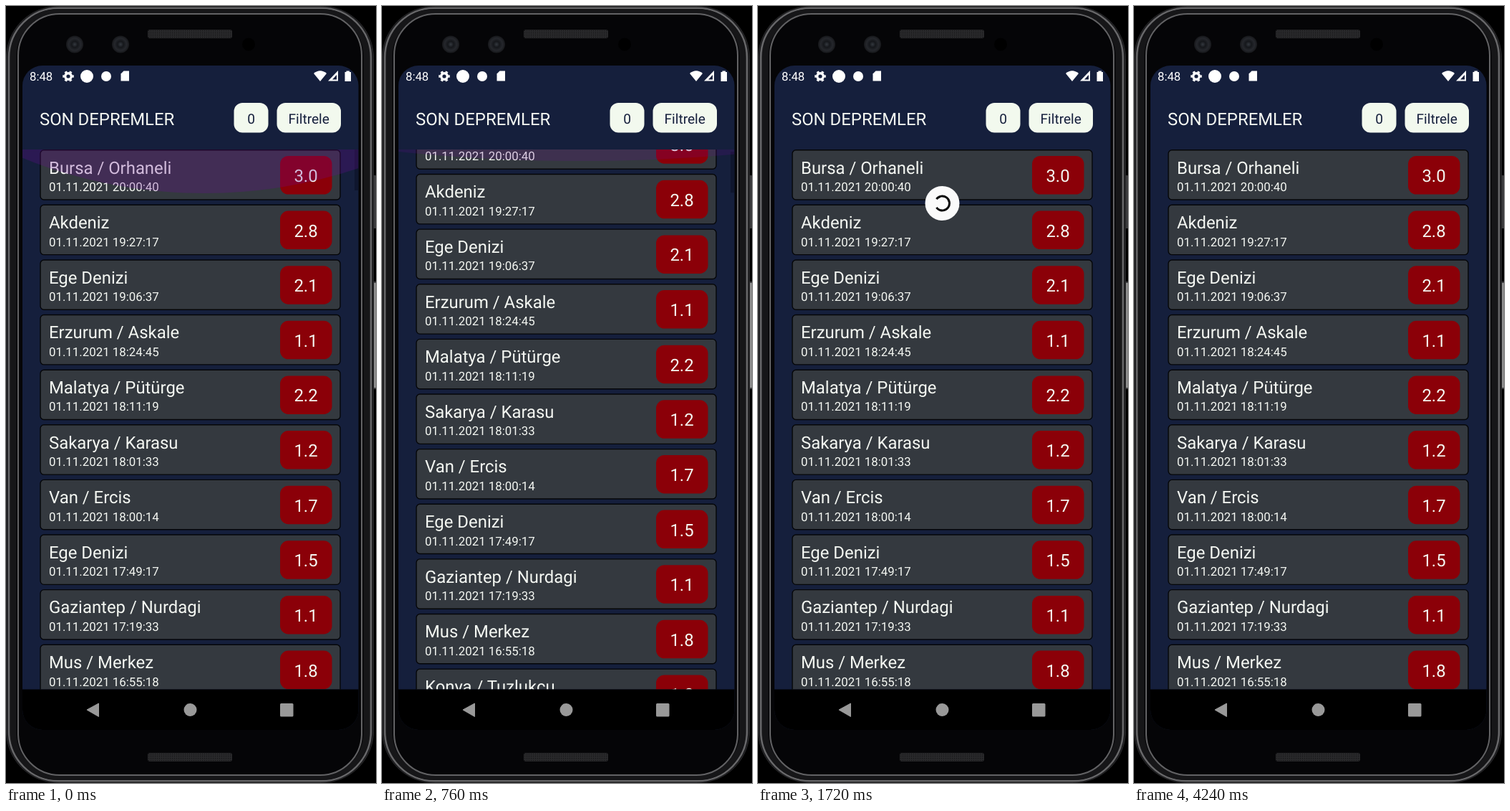
These frames come from a looping animation (517 px wide and 1083 px high, 4.28 s). An HTML page:

```html
<!DOCTYPE html>
<html lang="tr">
<head>
<meta charset="utf-8">
<title>Son Depremler</title>
<style>
  html, body { margin: 0; width: 100%; height: 100%; overflow: hidden; background: #000; }
  svg { display: block; width: 517px; height: 1083px; font-family: Roboto, sans-serif; text-rendering: geometricPrecision; }
  .card { fill: #34393f; stroke: #050608; stroke-width: 1.4; }
  .badge { fill: #8b0008; }
  .place, .value, .title { font-size: 23.9px; fill: #f4f7f2; }
  .date { font-size: 16.85px; fill: #f4f7f2; }
  .value, .label { text-anchor: middle; }
  .button { fill: #f2f9ee; }
  .label { font-size: 19.13px; fill: #151f3c; }
</style>
</head>
<body>
<svg viewBox="0 0 517 1083">
  <defs>
    <clipPath id="listArea"><rect x="23" y="200" width="469.5" height="752.5"/></clipPath>
    <clipPath id="screen"><rect x="23" y="83" width="469.5" height="926" rx="28"/></clipPath>
    <pattern id="mesh" width="3" height="3" patternUnits="userSpaceOnUse">
      <rect width="3" height="3" fill="#29292b"/><circle cx="1.5" cy="1.5" r=".8" fill="#151516"/>
    </pattern>
    <radialGradient id="lens">
      <stop offset="0" stop-color="#34383f"/><stop offset=".35" stop-color="#15171b"/>
      <stop offset=".7" stop-color="#25272c"/><stop offset="1" stop-color="#17181b"/>
    </radialGradient>
  </defs>

  <!-- Phone body -->
  <rect x="512" y="236" width="6" height="74" rx="2" fill="#3a3a3c"/>
  <rect x="512" y="384" width="6" height="150" rx="2" fill="#3a3a3c"/>
  <path d="M515.500 386V532" stroke="#aaa" stroke-width="2"/>
  <rect x=".5" y=".5" width="513" height="1082" rx="72" fill="#1a1a1c" stroke="#2a2a2c"/>
  <rect x="4" y="3" width="506" height="1077" rx="69" fill="none" stroke="#68686a" stroke-width="2.500"/>
  <rect x="10" y="8" width="494" height="1067" rx="63" fill="#0b0b0d" stroke="#161618" stroke-width="8"/>
  <rect x="17" y="11" width="480" height="1061" rx="58" fill="#050507" stroke="#626264" stroke-width="2"/>
  <rect x="198" y="33" width="118" height="12" rx="3" fill="url(#mesh)"/>
  <rect x="198" y="1041" width="118" height="12" rx="3" fill="url(#mesh)"/>
  <circle cx="96" cy="53.5" r="12" fill="url(#lens)"/>
  <circle cx="160" cy="53.5" r="12" fill="url(#lens)"/>
  <circle cx="339" cy="53.5" r="9" fill="#000"/>

  <g clip-path="url(#screen)">
    <rect x="23" y="83" width="470" height="926" fill="#151f3c"/>

    <!-- Status bar -->
    <g fill="#fff">
      <text x="33" y="104" font-size="16.74">8:48</text>
      <circle cx="87" cy="98" r="4.300" fill="none" stroke="#fff" stroke-width="3.400"/>
      <circle cx="87" cy="98" r="6.600" fill="none" stroke="#fff" stroke-width="2.400" pathLength="48" stroke-dasharray="4 4" stroke-dashoffset="2"/>
      <circle cx="113" cy="98" r="9"/>
      <circle cx="140" cy="98" r="7"/>
      <path d="M164.500 90.500H172V104.500H160.500V94.500Z"/>
      <path d="M430 94Q439 86.500 448 94L439 105Z"/>
      <path d="M464 90V104.500H450Z"/>
      <path d="M462 96V102.500H456Z" fill="#151f3c"/>
      <path d="M475.500 90.500H480V92H482V105H473.500V92H475.500Z"/>
    </g>

    <!-- Header -->
    <text class="title" x="47" y="165.500">SON DEPREMLER</text>
    <rect class="button" x="318.500" y="135" width="48" height="41.500" rx="12"/>
    <text class="label" x="342.500" y="163.700">0</text>
    <rect class="button" x="378.500" y="135" width="89.500" height="41.500" rx="12"/>
    <text class="label" x="423.200" y="163.700">Filtrele</text>

    <g clip-path="url(#listArea)">
      <g id="list"></g>
      <rect id="scrollbar" x="487" y="200" width="5" height="57" fill="#0e152b"/>
      <ellipse id="glow" fill="#6e0a98"/>
      <g id="spinner">
        <circle r="24" fill="#fafafa"/>
        <circle id="arc" r="10" fill="none" stroke="#0a0a0a" stroke-width="3" pathLength="100"/>
      </g>
    </g>

    <!-- Navigation bar -->
    <rect x="23" y="952.500" width="470" height="57" fill="#000"/>
    <g fill="#999">
      <path d="M113 981L129.500 972V990.500Z" stroke="#999" stroke-linejoin="round"/>
      <circle cx="257.500" cy="981" r="9"/>
      <rect x="383" y="972" width="18.500" height="18.500" rx="1.500"/>
    </g>
  </g>
</svg>
<script>
const LOOP = 4280, STEP = 40, PITCH = 76.62, LIST_TOP = 200;
const quakes = [
  ['Bursa / Orhaneli', '20:00:40', '3.0'],
  ['Akdeniz', '19:27:17', '2.8'],
  ['Ege Denizi', '19:06:37', '2.1'],
  ['Erzurum / Askale', '18:24:45', '1.1'],
  ['Malatya / Pütürge', '18:11:19', '2.2'],
  ['Sakarya / Karasu', '18:01:33', '1.2'],
  ['Van / Ercis', '18:00:14', '1.7'],
  ['Ege Denizi', '17:49:17', '1.5'],
  ['Gaziantep / Nurdagi', '17:19:33', '1.1'],
  ['Mus / Merkez', '16:55:18', '1.8'],
  ['Konya / Tuzlukçu', '', '1.0']
];

const byId = id => document.getElementById(id);
const setAttrs = (el, attrs) => {
  for (const name in attrs) el.setAttribute(name, attrs[name]);
};

byId('list').innerHTML = quakes.map(([place, time, value], i) => `
  <g transform="translate(0 ${LIST_TOP + i * PITCH})">
    <rect class="card" x="48" y=".7" width="419" height="69.300" rx="5"/>
    <text class="place" x="60" y="33.500">${place}</text>
    <text class="date" x="60" y="58">${time && '01.11.2021 ' + time}</text>
    <rect class="badge" x="383" y="9" width="72.500" height="53.500" rx="11.500"/>
    <text class="value" x="419" y="45">${value}</text>
  </g>`).join('');

// Piecewise linear curve through [time, value] points.
function curve(points, t) {
  const next = points.findIndex(p => p[0] > t);
  if (next < 0) return points[points.length - 1][1];
  if (next === 0) return points[0][1];
  const [t0, v0] = points[next - 1], [t1, v1] = points[next];
  return v0 + (v1 - v0) * (t - t0) / (t1 - t0);
}

const scrollY = [[0, 0], [400, 0], [440, .5], [520, 18], [640, 55], [700, 55], [880, 18.3], [1000, 0]];
const glowDepth = [[0, 61], [440, 64], [560, 30], [640, 4], [880, 28], [1000, 20], [1160, 0]];
const glowAlpha = [[0, .25], [440, .25], [640, .2], [880, .15], [1160, 0]];
const barAlpha = [[0, .8], [1160, .8], [1440, 0]];
const spinnerY = [[1200, 174], [1720, 275], [1800, 275], [2000, 252]];
const spinnerScale = [[2600, 1], [2760, 0]];

function draw(t) {
  const scroll = curve(scrollY, t);
  setAttrs(byId('list'), { transform: `translate(0 ${-scroll})` });
  setAttrs(byId('scrollbar'), { y: LIST_TOP + scroll * .075, opacity: curve(barAlpha, t) });

  // The glow is a wide circle squashed vertically against the list's top edge.
  const radius = 562, height = 75, squash = curve(glowDepth, t) / height;
  setAttrs(byId('glow'), {
    cx: 277, cy: LIST_TOP + (height - radius) * squash,
    rx: radius, ry: radius * squash, opacity: curve(glowAlpha, t)
  });

  const spin = Math.max(0, t - 1800);
  const length = 45 + 35 * Math.cos(spin / 1333 * 2 * Math.PI);
  const angle = 216 + Math.min(0, t - 1720) * .4 + spin * .45;
  setAttrs(byId('spinner'), {
    transform: `translate(257.5 ${curve(spinnerY, t)}) scale(${curve(spinnerScale, t)})`
  });
  setAttrs(byId('arc'), {
    transform: `rotate(${angle})`,
    'stroke-dasharray': `${length} ${100 - length}`,
    opacity: curve([[1200, .3], [1600, 1]], t)
  });
}

const start = performance.now();
function frame() {
  const t = (performance.now() - start) % LOOP;
  draw(Math.floor(t / STEP) * STEP);
  requestAnimationFrame(frame);
}
frame();
</script>
</body>
</html>
```
